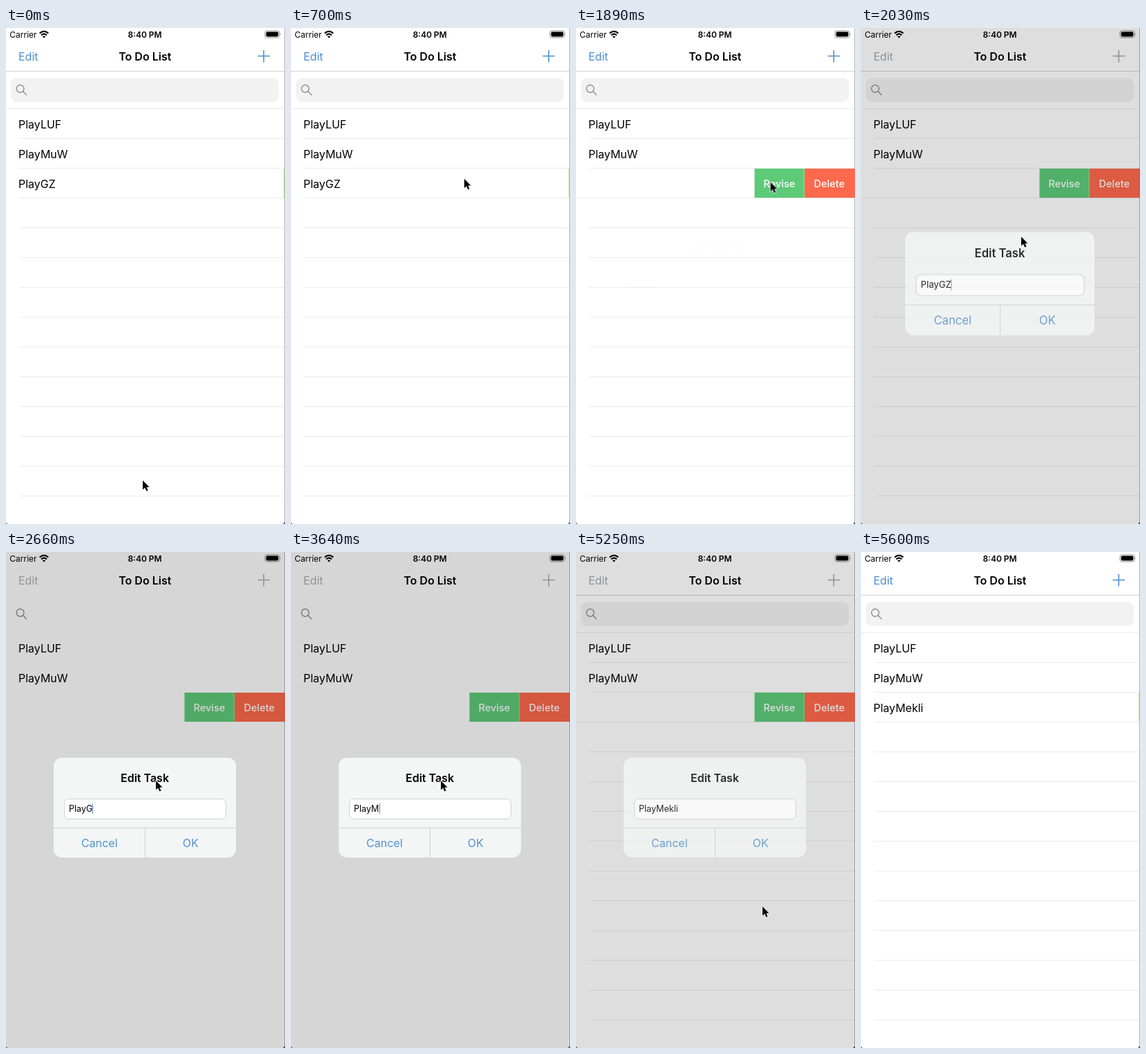
An HTML page for the animation above (5.95 s loop, 404 by 716 pixels).

```html
<!DOCTYPE html>
<html lang="en">
<head>
<meta charset="utf-8">
<title>To Do List</title>
<style>
@property --k { syntax: "<length>"; inherits: true; initial-value: 0px; }

html, body { margin: 0; width: 100%; height: 100%; overflow: hidden; background: #fff; }
body { font-family: Inter, sans-serif; color: #000; }
#stage { position: relative; width: 404px; height: 716px; overflow: hidden; }
svg { position: absolute; left: 0; top: 0; display: block; }
text { font-size: 16px; }
.bold { font-weight: 600; }
.mid { text-anchor: middle; }
.small { font-size: 12px; }
.action { font-size: 14.5px; font-weight: 500; fill: #fff; }

#nav, #lines, #row, #dim, #alert, #cursor, .before, .after, .inset,
.field::before, .field::after {
  animation-duration: 5950ms;
  animation-iteration-count: infinite;
  animation-timing-function: linear;
}

#nav { color: #4a90d0; animation-name: tint; }
#lines { animation-name: melt; }
.inset { animation-name: inset; animation-timing-function: step-end; }

/* --k is how far one action button is pulled out */
#row { animation-name: swipe; }
.near { transform: translateX(calc(var(--k) * -1)); }
.far { transform: translateX(calc(var(--k) * -2)); }
.before { animation-name: before; animation-timing-function: step-end; }
.after { animation-name: after; animation-timing-function: step-end; }

#dim { position: absolute; inset: 0; background: rgba(0, 0, 0, .16); animation-name: fade; }
#alert {
  position: absolute; left: 69px; top: 297px; width: 264px; height: 144px;
  border-radius: 12px; background: #f4f5f5; overflow: hidden;
  animation-name: fade, zoom;
}
.field {
  position: absolute; left: 15px; top: 59px; width: 235px; height: 30px;
  box-sizing: border-box; padding-left: 6px; border: 1px solid #d2d2d4; border-radius: 7px;
  background: #fff; font-size: 12.6px; line-height: 28px; white-space: nowrap;
}
.field::before { content: "PlayGZ"; animation-name: type; animation-timing-function: step-end; }
.field::after {
  content: ""; display: inline-block; width: 1px; height: 15px;
  vertical-align: -3px; background: #5b86d8;
  animation-name: caret; animation-timing-function: step-end;
}
#cursor { animation-name: point; }

@keyframes tint {
  0%, 31.76% { color: #4a90d0; }
  34.12% { color: #a0a8b0; }
  37.65%, 85.88% { color: #adadad; }
  88.24% { color: #a0a8b0; }
  92.94%, 100% { color: #4a90d0; }
}
@keyframes melt {
  0%, 34.12% { opacity: 1; }
  37.65%, 85.88% { opacity: 0; }
  88.24%, 100% { opacity: 1; }
}
@keyframes inset {
  0% { visibility: hidden; }
  14.2% { visibility: visible; }
  94.1% { visibility: hidden; }
}
@keyframes swipe {
  0%, 14.12% { --k: 0px; }
  18.82% { --k: 57.5px; }
  21.18% { --k: 70px; }
  23.53%, 94.09% { --k: 72.75px; }
  94.1%, 100% { --k: 0px; }
}
@keyframes before {
  0% { visibility: visible; }
  94.1% { visibility: hidden; }
}
@keyframes after {
  0% { visibility: hidden; }
  94.1%, 100% { visibility: visible; }
}
@keyframes fade {
  0%, 31.76% { opacity: 0; }
  32.94% { opacity: .45; }
  34.12% { opacity: .8; }
  37.65%, 87.06% { opacity: 1; }
  88.24% { opacity: .8; }
  92.94%, 100% { opacity: 0; }
}
@keyframes zoom {
  0%, 31.76% { transform: scale(1.2); }
  32.94% { transform: scale(1.1); }
  34.12% { transform: scale(1.04); }
  37.65%, 100% { transform: scale(1); }
}
@keyframes type {
  0% { content: "PlayGZ"; }
  43.52% { content: "PlayG"; }
  45.88% { content: "Play"; }
  52.94% { content: "PlayM"; }
  62.35% { content: "PlayMe"; }
  64.7% { content: "PlayMek"; }
  74.11% { content: "PlayMekl"; }
  76.47%, 100% { content: "PlayMekli"; }
}
@keyframes caret {
  0% { visibility: visible; }
  84.7%, 100% { visibility: hidden; }
}
@keyframes point {
  0% { transform: translate(198px, 653px); animation-timing-function: ease-in-out; }
  9.41%, 10.59% { transform: translate(211px, 217px); }
  14.12% { transform: translate(329px, 219px); }
  18.82% { transform: translate(214px, 219px); }
  21.18% { transform: translate(188px, 221px); animation-timing-function: ease-in-out; }
  31.76% { transform: translate(282px, 222px); }
  32.94% { transform: translate(262px, 250px); }
  34.12% { transform: translate(232px, 301px); }
  36.47% { transform: translate(219px, 326px); }
  41.18%, 72.94% { transform: translate(217px, 330px); animation-timing-function: ease-in-out; }
  83.53% { transform: translate(262px, 416px); }
  88.24% { transform: translate(270px, 511px); }
  90.59% { transform: translate(268px, 640px); }
  92%, 100% { transform: translate(266px, 740px); }
}
</style>
</head>
<body>
<div id="stage">
  <svg width="404" height="716" viewBox="0 0 404 716">
    <defs>
      <pattern id="rule" y="117" width="404" height="43" patternUnits="userSpaceOnUse">
        <rect y="42" width="404" height="1" fill="#ebebeb"/>
      </pattern>
    </defs>
    <rect width="404" height="716" fill="#fff"/>

    <g id="lines">
      <rect y="62" width="404" height="1" fill="#d2d2d2"/>
      <rect y="116" width="404" height="1" fill="#ebebeb"/>
      <rect x="7" y="72" width="388" height="35" rx="9" fill="#f2f2f2"/>
      <rect x="19" y="117" width="385" height="559" fill="url(#rule)"/>
      <rect class="inset" y="245" width="19" height="1" fill="#ebebeb"/>
    </g>
    <rect x="403" width="1" height="716" fill="#b4b4b4"/>
    <path d="M0 716v-2l2 2zM404 716v-3l-3 3z" fill="#444"/>

    <g id="nav">
      <text x="18" y="46.5" fill="currentColor">Edit</text>
      <path d="M364.5 40.5h17.5M373.25 32v17.5" stroke="currentColor" stroke-width="1.6"/>
    </g>
    <text class="bold mid" x="201.3" y="46.5">To Do List</text>
    <g fill="none" stroke="#8e8e93" stroke-width="1.4" stroke-linecap="round">
      <circle cx="20.6" cy="87.6" r="5.4"/>
      <path d="M24.6 91.6l4.9 4.9"/>
    </g>

    <text class="small" x="5.3" y="14">Carrier</text>
    <text class="small bold mid" x="201" y="14">8:40 PM</text>
    <g fill="none" stroke="#000" stroke-width="2.2">
      <path d="M48.8 7.6q6.2-5.6 12.4 0M51.1 10.4q3.9-3.4 7.8 0"/>
      <path d="M55 14.6l-2.2-2.3q2.2-1.8 4.4 0z" fill="#000" stroke="none"/>
    </g>
    <rect x="375" y="4" width="21" height="10" rx="3" fill="none" stroke="#8c8c8c"/>
    <rect x="376.6" y="5.6" width="17.8" height="6.8" rx="1.8"/>
    <path d="M397.2 7.3q1.5 1.7 0 3.4z" fill="#8c8c8c"/>

    <text x="18" y="144.5">PlayLUF</text>
    <text x="18" y="187.5">PlayMuW</text>

    <g id="row">
      <g class="far">
        <text class="before" x="18" y="230.5">PlayGZ</text>
        <text class="after" x="18" y="230.5">PlayMekli</text>
      </g>
      <g class="far">
        <rect x="404" y="203" width="146" height="42" fill="#5dca78"/>
        <text class="action" x="417" y="229.8">Revise</text>
      </g>
      <g class="near">
        <rect x="402" y="203" width="2" height="42" fill="#a9cf86" opacity=".7"/>
        <rect x="404" y="203" width="74" height="42" fill="#fc694c"/>
        <text class="action" x="417.3" y="229.8">Delete</text>
      </g>
    </g>
  </svg>

  <div id="dim"></div>

  <!-- keeps the status bar at full strength above the shade -->
  <div id="alert">
    <svg width="264" height="144">
      <text class="bold mid" x="132" y="35">Edit Task</text>
      <path d="M0 101.5h264M132.5 101.5V144" stroke="#d0d1d2"/>
      <g class="mid" fill="#4f93cf">
        <text x="66.3" y="128.7">Cancel</text>
        <text x="198.3" y="128.7">OK</text>
      </g>
    </svg>
    <div class="field"></div>
  </div>

  <svg width="404" height="716">
    <path id="cursor" d="M0 0V13.4L3.1 10.6L5.3 15.6L7.6 14.6L5.4 9.7H9.6Z"
      stroke="#fff" stroke-width="1.6" stroke-linejoin="round" paint-order="stroke"/>
  </svg>
</div>
</body>
</html>
```
